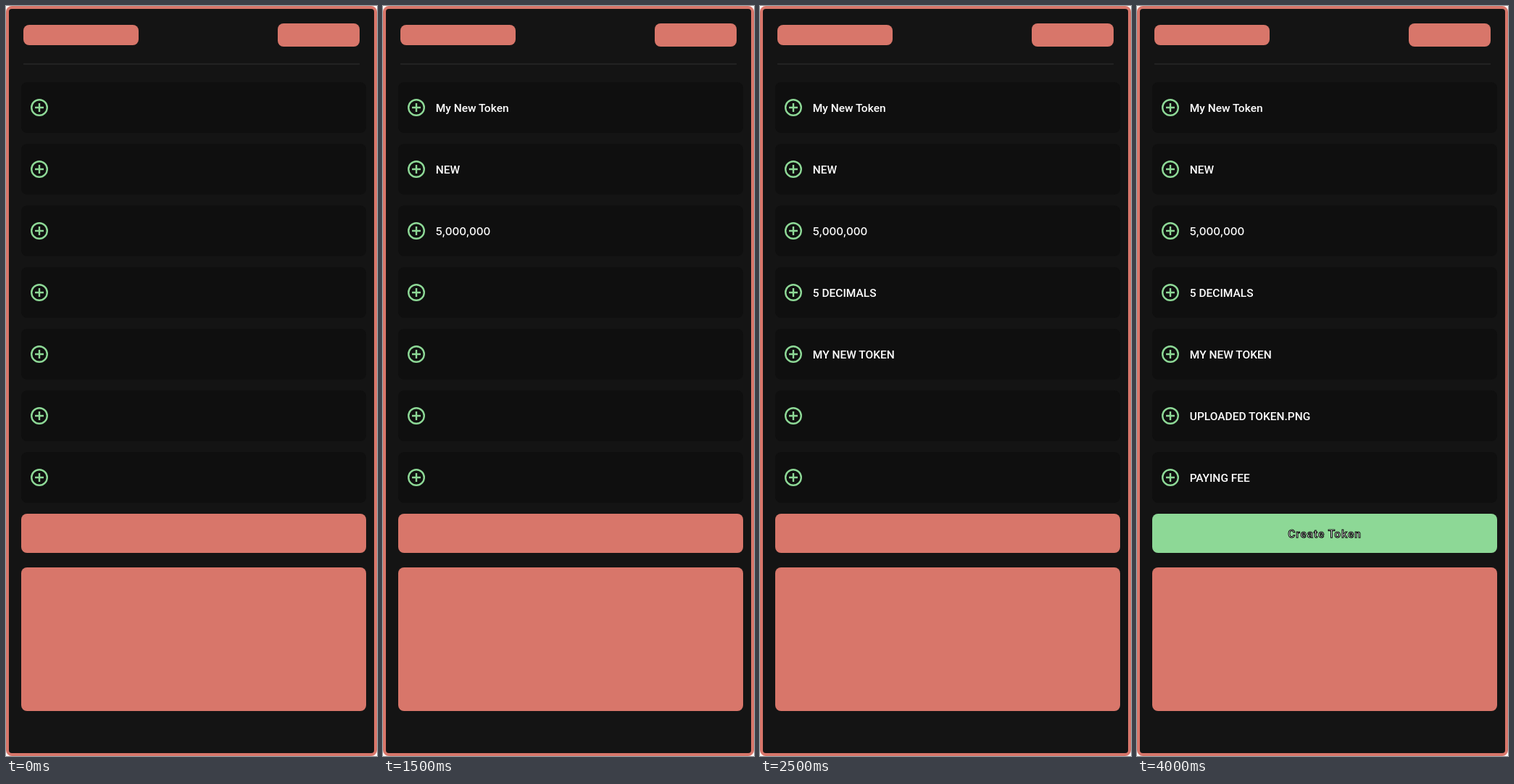
Animation, 512 px wide and 1034 px high, one loop 4.5 s. Source, as an HTML page:

```html
<!DOCTYPE html>
<html lang="en">
<head>
<meta charset="utf-8">
<title>Create token form</title>
<style>
  html, body { margin: 0; width: 100%; height: 100%; overflow: hidden; background: #fff; }
  svg { display: block; width: 100%; height: 100%; }
  .coral { fill: #d8766a; }
  .panel { fill: #0f0f0f; }
  .icon { fill: none; stroke: #8dd896; stroke-width: 2.4; }
  .label { font: 500 15.5px Roboto, sans-serif; fill: #fff; }
  .digits { font: 500 15.2px Inter, sans-serif; }
  .action { letter-spacing: .9px; stroke: #000; stroke-width: 1px; text-anchor: middle; }
</style>
</head>
<body>
<svg viewBox="0 0 512 1034">
  <rect class="coral" width="512" height="1034" rx="8"/>
  <rect x="4" y="4" width="504" height="1026" rx="4" fill="#141414"/>
  <rect class="coral" x="24" y="26" width="159" height="28" rx="8"/>
  <rect class="coral" x="375" y="24" width="113" height="32" rx="8"/>
  <rect x="24" y="79" width="464" height="2" fill="#222"/>
  <g id="rows"></g>
  <rect id="button" class="coral" x="21" y="700" width="476" height="54" rx="8"/>
  <text id="action" class="label action" x="259" y="733">Create Token</text>
  <rect class="coral" x="21" y="774" width="476" height="198" rx="8"/>
</svg>
<script>
  const LOOP = 4500, STEP = 500;
  const values = ['My New Token', 'NEW', '5,000,000', '5 DECIMALS',
    'MY NEW TOKEN', 'UPLOADED TOKEN.PNG', 'PAYING FEE'];
  const byId = id => document.getElementById(id);

  const row = (value, i) => `<g transform="translate(0 ${105 + 85 * i})">
    <rect class="panel" x="21" width="476" height="70" rx="8"/>
    <circle class="icon" cx="46" cy="35" r="10.8"/>
    <path class="icon" d="M40 35h12M46 29v12"/>
    <text class="label ${/^[\d,]+$/.test(value) ? 'digits' : ''}" x="72.8" y="41">${value}</text>
  </g>`;

  byId('rows').innerHTML = values.map(row).join('');
  const labels = [...document.querySelectorAll('#rows text')];
  const show = (el, on) => el.setAttribute('visibility', on ? 'visible' : 'hidden');

  function draw(time) {
    const step = Math.floor((time % LOOP) / STEP);
    const ready = step > values.length;
    labels.forEach((label, i) => show(label, step > i));
    show(byId('action'), ready);
    byId('button').style.fill = ready ? '#8dd896' : '';
  }

  const start = performance.now();
  function tick(now) {
    draw(Math.max(0, now - start));
    requestAnimationFrame(tick);
  }
  draw(0);
  requestAnimationFrame(tick);
</script>
</body>
</html>
```
